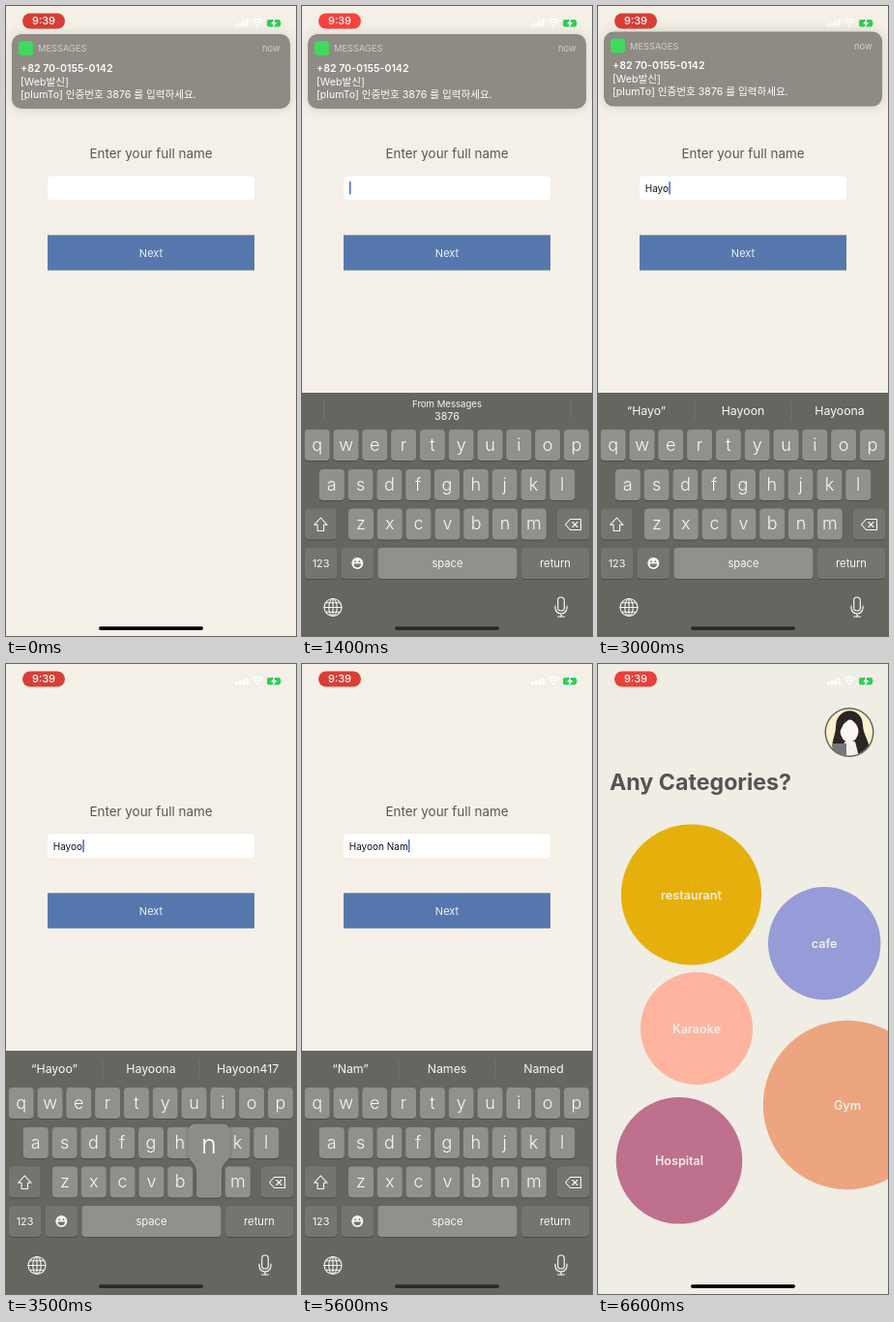
Animation, 300 px wide and 650 px high, one loop 6.67 s. Source, as an HTML page with a canvas:

```html
<!DOCTYPE html>
<html lang="en">
<head>
<meta charset="utf-8">
<title>Sign-up</title>
<style>
html, body { margin: 0; width: 100%; height: 100%; overflow: hidden; background: #f4f0e7; }
canvas { display: block; width: 300px; height: 650px; }
</style>
</head>
<body>
<canvas id="stage"></canvas>
<script>
const LOOP = 6670, W = 300, H = 650;
const canvas = document.getElementById('stage');
const g = canvas.getContext('2d');
const dpr = window.devicePixelRatio || 1;
canvas.width = W * dpr;
canvas.height = H * dpr;

const FONT = 'Inter, "Noto Sans CJK KR", "Noto Sans CJK", sans-serif';
const KEY = '#91908c', DARK_KEY = '#757470', BOARD = '#666661', WHITE = '#f8f7f4';
const ROWS = [
  { keys: 'qwertyuiop', x: 15.7, y: 437 },
  { keys: 'asdfghjkl', x: 30.8, y: 478 },
  { keys: 'zxcvbnm', x: 61, y: 518.5 }
];
const PITCH = 29.8, KEY_W = 26, KEY_H = 32;

// when each character lands in the field, and the suggestions that follow
const TYPED = [
  { at: 1720, ch: 'H', hints: ['“H”', 'He', 'Have'] },
  { at: 2040, ch: 'a', hints: ['“Ha”', 'Has', 'Haha'] },
  { at: 2340, ch: 'y', hints: ['“Hay”', 'Hayo', 'Hayoo'] },
  { at: 2760, ch: 'o', hints: ['“Hayo”', 'Hayoon', 'Hayoona'] },
  { at: 3160, ch: 'o', hints: ['“Hayoo”', 'Hayoona', 'Hayoon417'] },
  { at: 3560, ch: 'n', hints: ['“Hayoon”', 'Hayoona', 'Hayoon417'] },
  { at: 3960, ch: ' ', hints: ['you', 'the', 'I'] },
  { at: 4760, ch: 'N', hints: ['“N”', 'No', 'Not'] },
  { at: 5130, ch: 'a', hints: ['“Na”', 'Nah', 'Nap'] },
  { at: 5490, ch: 'm', hints: ['“Nam”', 'Names', 'Named'] }
];
const SHIFTS = [[1500, 1720], [4450, 4760]];

const clamp = v => Math.max(0, Math.min(1, v));
const ramp = (t, a, b) => clamp((t - a) / (b - a));
const ease = v => 1 - Math.pow(1 - v, 3);
const smooth = v => v * v * (3 - 2 * v);

function text(s, x, y, size, color, weight = 400, align = 'center', spacing = 0) {
  g.font = `${weight} ${size}px ${FONT}`;
  g.letterSpacing = spacing + 'px';
  g.textAlign = align;
  g.fillStyle = color;
  g.fillText(s, x, y);
}

function box(x, y, w, h, r, color) {
  g.fillStyle = color;
  g.beginPath();
  g.roundRect(x, y, w, h, r);
  g.fill();
}

function disc(x, y, r, color) {
  g.fillStyle = color;
  g.beginPath();
  g.arc(x, y, r, 0, 7);
  g.fill();
}

function line(points, color, width, close) {
  g.strokeStyle = color;
  g.lineWidth = width;
  g.lineJoin = g.lineCap = 'round';
  g.beginPath();
  points.forEach(p => g.lineTo(p[0], p[1]));
  if (close) g.closePath();
  g.stroke();
}

function poly(points, color) {
  g.fillStyle = color;
  g.beginPath();
  points.forEach(p => g.lineTo(p[0], p[1]));
  g.fill();
}

function faded(alpha, draw) {
  g.save();
  g.globalAlpha *= alpha;
  draw();
  g.restore();
}

function statusBar(t) {
  const glow = smooth(clamp(0.5 + 0.8 * Math.cos(2 * Math.PI * (t / 2800 - 0.6))));
  const mix = (a, b) => Math.round(a + (b - a) * glow);
  box(17, 7.5, 44, 16, 8, `rgb(${mix(217, 248)},${mix(62, 66)},${mix(54, 60)})`);
  text('9:39', 39, 19.3, 11, '#fff', 500);
  for (let i = 0; i < 4; i++) box(237 + i * 3.7, 18.5 - i * 1.5, 2.6, 3 + i * 1.5, 0.7, '#fff');
  g.strokeStyle = '#fff';
  g.lineCap = 'butt';
  g.lineWidth = 1.7;
  for (const r of [5, 8]) {
    g.beginPath();
    g.arc(260, 21.5, r, -Math.PI * 0.76, -Math.PI * 0.24);
    g.stroke();
  }
  disc(260, 20.2, 1.5, '#fff');
  box(270, 14, 14, 7.5, 2, '#2fce58');
  box(284.3, 16.3, 1.2, 3, 0.6, '#a9dfb4');
  poly([[278.6, 12.6], [274.2, 18.4], [276.8, 18.4], [275.6, 23], [280.2, 17], [277.4, 17]], '#fff');
}

function notice(t) {
  const up = ramp(t, 2950, 3300);
  if (up >= 1) return;
  g.save();
  g.translate(0, -112 * up * up);
  g.shadowColor = 'rgba(90,85,70,.22)';
  g.shadowBlur = 12 * dpr;
  box(6, 29, 288, 77, 10, '#8d8b83');
  g.shadowColor = 'transparent';
  box(13, 36, 15, 15, 3.5, '#3fd95c');
  text('MESSAGES', 33, 47.3, 9.3, '#d0cec8', 400, 'left');
  text('now', 283.5, 47.3, 9.3, '#d0cec8', 400, 'right');
  text('+82 70-0155-0142', 15, 67.5, 10.6, '#fff', 600, 'left');
  text('[Web발신]', 15, 81.5, 10.6, '#fff', 400, 'left');
  text('[plumTo] 인증번호 3876 를 입력하세요.', 15, 94.5, 10.6, '#fff', 400, 'left');
  g.restore();
}

function form(t) {
  g.fillStyle = '#f4f0e7';
  g.fillRect(0, 0, W, H);
  text('Enter your full name', 150, 157.3, 13.4, '#5b5558');
  box(43, 175.5, 214, 24.5, 4, '#fff');
  const done = TYPED.filter(k => k.at <= t);
  const value = done.map(k => k.ch).join('');
  text(value, 48.7, 191.6, 10, '#111', 400, 'left');
  const since = t - (done.length ? done[done.length - 1].at : 600);
  if (t > 600 && t < 5900 && (since < 500 || (since - 500) % 1000 > 300 || since < 800))
    box(49 + g.measureText(value).width, 181, 1.5, 13.5, 0.7, '#4668cf');
  faded(t > 5800 && t < 5960 ? 0.45 : 1, () => {
    g.fillStyle = '#5677ae';
    g.fillRect(43, 236.3, 214, 36.4);
    text('Next', 150, 258.7, 11, '#eef2f8');
  });
}

function key(x, y, w, color) {
  box(x, y + 1, w, KEY_H, 4, '#4e4d49');
  box(x, y, w, KEY_H, 4, color);
}

function hintRow(hints) {
  for (const x of hints ? [100, 200] : [22.5, 278]) {
    g.fillStyle = '#75746f';
    g.fillRect(x - 0.5, 408, 1, 19);
  }
  if (hints) hints.forEach((s, i) => text(s, 50 + i * 100, 421.7, 12.3, WHITE));
  else {
    text('From Messages', 150, 413.6, 9.6, WHITE);
    text('3876', 150, 426.6, 10.8, WHITE);
  }
}

function hintBar(t) {
  const n = TYPED.filter(k => k.at <= t).length;
  const now = n ? TYPED[n - 1] : null;
  const mix = now ? ramp(t, now.at, now.at + 110) : 1;
  if (mix < 1) faded(1 - mix, () => hintRow(n > 1 ? TYPED[n - 2].hints : null));
  faded(mix, () => hintRow(now && now.hints));
}

function popup(x, y, label) {
  const l = x - 13, r = x + 13, L = x - 22, R = x + 22, top = y - 44;
  g.fillStyle = '#8d8c88';
  g.shadowColor = 'rgba(40,40,36,.4)';
  g.shadowBlur = 3 * dpr;
  g.beginPath();
  g.moveTo(L + 8, top);
  g.arcTo(R, top, R, top + 10, 8);
  g.lineTo(R, y - 14);
  g.bezierCurveTo(R, y - 5, r, y - 5, r, y + 6);
  g.arcTo(r, y + KEY_H, l, y + KEY_H, 4);
  g.arcTo(l, y + KEY_H, l, y, 4);
  g.lineTo(l, y + 6);
  g.bezierCurveTo(l, y - 5, L, y - 5, L, y - 14);
  g.arcTo(L, top, R, top, 8);
  g.fill();
  g.shadowColor = 'transparent';
  text(label, x, y - 13.5, 27, '#fff', 300);
}

function globe(x, y) {
  g.strokeStyle = WHITE;
  g.lineWidth = 1.1;
  for (const rx of [9, 4.2]) {
    g.beginPath();
    g.ellipse(x, y, rx, 9, 0, 0, 7);
    g.stroke();
  }
  line([[x, y - 9], [x, y + 9]], WHITE, 1.1);
  for (const [dy, w] of [[0, 9], [-4.7, 7.5], [4.7, 7.5]]) line([[x - w, y + dy], [x + w, y + dy]], WHITE, 1.1);
}

function mic(x, y) {
  g.strokeStyle = WHITE;
  g.lineWidth = 1.2;
  g.beginPath();
  g.roundRect(x - 3.3, y - 10, 6.6, 14, 3.3);
  g.stroke();
  g.beginPath();
  g.moveTo(x - 6, y - 1);
  g.lineTo(x - 6, y + 1);
  g.arc(x, y + 1, 6, Math.PI, 0, true);
  g.lineTo(x + 6, y - 1);
  g.stroke();
  line([[x, y + 7], [x, y + 10]], WHITE, 1.2);
  line([[x - 3.5, y + 10], [x + 3.5, y + 10]], WHITE, 1.2);
}

function smiley(x, y) {
  disc(x, y, 6, WHITE);
  disc(x - 2.1, y - 1.8, 0.9, DARK_KEY);
  disc(x + 2.1, y - 1.8, 0.9, DARK_KEY);
  g.fillStyle = DARK_KEY;
  g.beginPath();
  g.arc(x, y + 0.6, 3.7, 0, Math.PI);
  g.fill();
}

function keyboard(t) {
  const shown = ease(ramp(t, 600, 950)) - ease(ramp(t, 5900, 6200));
  if (shown <= 0) return;
  g.save();
  g.translate(0, 251 * (1 - shown));
  g.fillStyle = BOARD;
  g.fillRect(0, 399, W, 251);
  hintBar(t);

  const upper = SHIFTS.some(([a, b]) => t >= a && t < b);
  const down = TYPED.find(k => t >= k.at - 110 && t < k.at + 85);
  let pressed = null;
  for (const row of ROWS) [...row.keys].forEach((c, i) => {
    const x = row.x + i * PITCH;
    key(x - KEY_W / 2, row.y, KEY_W, KEY);
    text(upper ? c.toUpperCase() : c, x, row.y + (upper ? 22.5 : 21.7), 18, WHITE, 300);
    if (down && down.ch.toLowerCase() === c) pressed = [x, row.y, down.ch];
  });

  key(3, 518.5, 32.5, upper ? '#efeeeb' : DARK_KEY);
  const arrow = [[19.3, 528], [26, 535.3], [22.5, 535.3], [22.5, 541.5], [16.1, 541.5], [16.1, 535.3], [12.6, 535.3]];
  if (upper) poly(arrow, '#33322f');
  line(arrow, upper ? '#33322f' : WHITE, 1.1, true);

  key(264, 518.5, 33, DARK_KEY);
  line([[272.5, 535], [277.5, 529.5], [288.5, 529.5], [288.5, 540.5], [277.5, 540.5]], WHITE, 1.1, true);
  line([[279.8, 532.5], [284.8, 537.5]], WHITE, 1.1);
  line([[284.8, 532.5], [279.8, 537.5]], WHITE, 1.1);

  key(3, 559, 33, DARK_KEY);
  text('123', 19.5, 579, 10.8, WHITE);
  key(40.5, 559, 33.5, DARK_KEY);
  smiley(57.3, 575);
  key(78.5, 559, 144, down && down.ch === ' ' ? DARK_KEY : KEY);
  text('space', 150.5, 578.7, 11.2, WHITE);
  key(227, 559, 70, DARK_KEY);
  text('return', 262, 578.7, 11.2, WHITE);
  globe(32, 620.5);
  mic(268, 620);
  if (pressed) popup(...pressed);
  g.restore();
}

function avatar() {
  g.save();
  disc(260, 70.5, 25.5, '#66645c');
  g.beginPath();
  g.arc(260, 70.5, 24, 0, 7);
  g.clip();
  g.fillStyle = '#fbf1cd';
  g.fillRect(234, 44, 52, 52);
  g.fillStyle = '#2b2526';
  g.beginPath();
  g.moveTo(246, 96);
  g.bezierCurveTo(238, 82, 246, 76, 246, 64);
  g.bezierCurveTo(247, 43, 274, 43, 274, 64);
  g.bezierCurveTo(275, 77, 286, 84, 277, 96);
  g.fill();
  poly([[255, 80], [266, 80], [270, 96], [252, 96]], '#f5f1ef');
  g.fillStyle = '#fdf5ef';
  g.beginPath();
  g.ellipse(260, 69, 9.5, 11.5, 0, 0, 7);
  g.fill();
  poly([[250, 70], [250, 58], [260, 53], [270, 58], [271, 70], [267, 62], [261, 56], [254, 62]], '#2b2526');
  g.fillStyle = '#77767a';
  g.fillRect(243, 82, 14, 12);
  g.restore();
}

function categories() {
  g.fillStyle = '#f0ede4';
  g.fillRect(0, 0, W, H);
  text('Any Categories?', 12, 130.3, 23.2, '#555355', 700, 'left');
  avatar();
  for (const [label, x, y, r, color] of [
    ['restaurant', 96.5, 238, 72.6, '#e6b00c'],
    ['cafe', 234.2, 288.2, 58.2, '#979bd8'],
    ['Karaoke', 102, 376, 58, '#feb49f'],
    ['Gym', 258, 455, 87.2, '#eca57f'],
    ['Hospital', 84, 512.3, 65.3, '#be708e']
  ]) {
    disc(x, y, r, color);
    text(label, x, y + 4.6, 12.6, '#f5efe5', 600);
  }
}

function draw(t) {
  g.setTransform(dpr, 0, 0, dpr, 0, 0);
  g.clearRect(0, 0, W, H);
  const push = ease(ramp(t, 6020, 6420));
  if (push < 1) {
    g.save();
    g.translate(-90 * push, 0);
    form(t);
    g.restore();
    keyboard(t);
  }
  if (push > 0) {
    g.save();
    g.translate(W * (1 - push), 0);
    categories();
    g.restore();
  }
  statusBar(t);
  notice(t);
  const onBoard = t > 700 && t < 6100;
  box(96, 640.3, 108, 3.6, 1.8, onBoard ? '#2b2a28' : '#000');
}

const start = performance.now();
function tick() {
  draw((performance.now() - start) % LOOP);
  requestAnimationFrame(tick);
}
tick();
</script>
</body>
</html>
```
